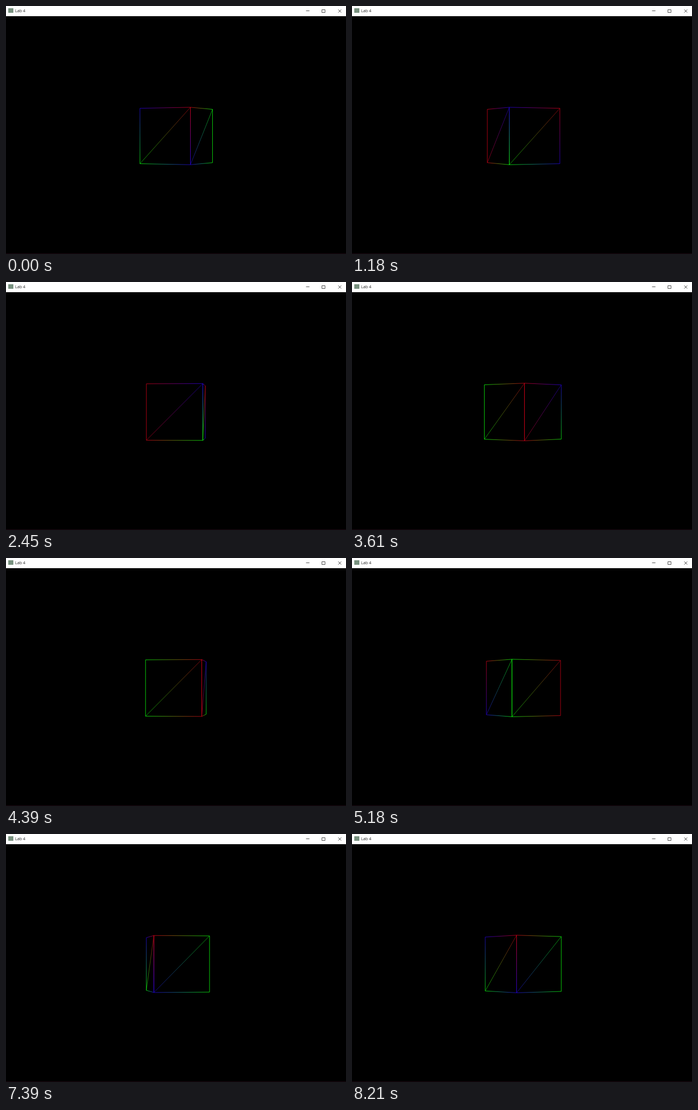
Write an HTML page with a canvas that moves like this. It is 600 px wide and 438 px high and loops after 8.24 s.

```html
<!DOCTYPE html>
<html lang="en">
<head>
<meta charset="utf-8">
<title>Lab 4</title>
<style>
  html, body { margin: 0; width: 100%; height: 100%; overflow: hidden; background: #000; }
  #stage { position: relative; width: 600px; height: 438px; overflow: hidden; background: #000; }
  canvas { position: absolute; left: 0; top: 0; }
  .bar { position: absolute; left: 0; top: 0; width: 600px; height: 18px; background: #fff; }
  .icon { position: absolute; left: 4px; top: 4px; width: 9px; height: 8px; background: #78917f; }
  .title {
    position: absolute; left: 16px; top: 3px;
    font: 7.2px/11px "Open Sans", "Noto Sans", sans-serif;
    color: #222; white-space: nowrap;
  }
  .bar svg { position: absolute; left: 0; top: 0; fill: none; stroke: #444; stroke-width: .9; }
  .edge { position: absolute; left: 0; bottom: 0; width: 600px; height: 1px; background: #1a0810; }
</style>
</head>
<body>
<div id="stage">
  <canvas id="view" width="600" height="438"></canvas>
  <div class="bar">
    <div class="icon"></div>
    <div class="title">Lab 4</div>
    <svg width="600" height="18">
      <path d="M529.5 8.5h6M557.5 6.5h5.5v5h-5.5zM586.3 6.2l5.4 5.4M591.7 6.2l-5.4 5.4"/>
    </svg>
  </div>
  <div class="edge"></div>
</div>
<script>
const LOOP = 8240;
const CX = 301.6, CY = 229.6;
const DIST = 25, FOCAL = 1200;   // camera distance in half cube sides
const RED = [190, 0, 20], GREEN = [10, 230, 10], BLUE = [30, 0, 200];

// Upright cube edges, left to right around the cube
const corners = [
  { turn: -180, top: RED, bottom: RED },
  { turn: -90, top: BLUE, bottom: GREEN },
  { turn: 0, top: RED, bottom: BLUE },
  { turn: 90, top: GREEN, bottom: GREEN }
];

// Time in ms, angle in degrees
const spin = [[0, 19.4], [1180, 70.4], [2450, 130.1], [3610, 182.2],
              [5180, 254.4], [6450, 295.4], [8240, 352]];

const ctx = document.getElementById('view').getContext('2d');

function angleAt(t) {
  const i = Math.max(1, spin.findIndex(k => t < k[0]));
  const [t0, a0] = spin[i - 1], [t1, a1] = spin[i];
  return a0 + (a1 - a0) * (t - t0) / (t1 - t0);
}

function project(corner, angle) {
  const a = (angle + corner.turn) * Math.PI / 180;
  const scale = FOCAL / (DIST - Math.SQRT2 * Math.cos(a));
  const x = CX + Math.SQRT2 * Math.sin(a) * scale;
  return {
    top: { x, y: CY - scale, color: corner.top },
    bottom: { x, y: CY + scale, color: corner.bottom }
  };
}

function line(p, q, alpha) {
  const shade = ctx.createLinearGradient(p.x, p.y, q.x, q.y);
  shade.addColorStop(0, `rgb(${p.color})`);
  shade.addColorStop(1, `rgb(${q.color})`);
  ctx.strokeStyle = shade;
  ctx.globalAlpha = alpha;
  ctx.beginPath();
  ctx.moveTo(p.x, p.y);
  ctx.lineTo(q.x, q.y);
  ctx.stroke();
}

function drawFace(l, r) {
  line(l.top, r.top, .85);
  line(l.bottom, r.bottom, .85);
  line(l.top, l.bottom, .85);
  line(r.top, r.bottom, .85);
  line(l.bottom, r.top, .65);
}

function draw(t) {
  ctx.clearRect(0, 0, 600, 438);
  ctx.lineWidth = 1;
  const angle = angleAt(t);
  const pts = corners.map(c => project(c, angle));
  pts.forEach((l, i) => {
    const r = pts[(i + 1) % 4];
    if (l.top.x < r.top.x) drawFace(l, r);   // back faces are culled
  });
}

const start = performance.now();
function tick() {
  draw((performance.now() - start) % LOOP);
  requestAnimationFrame(tick);
}
tick();
</script>
</body>
</html>
```
